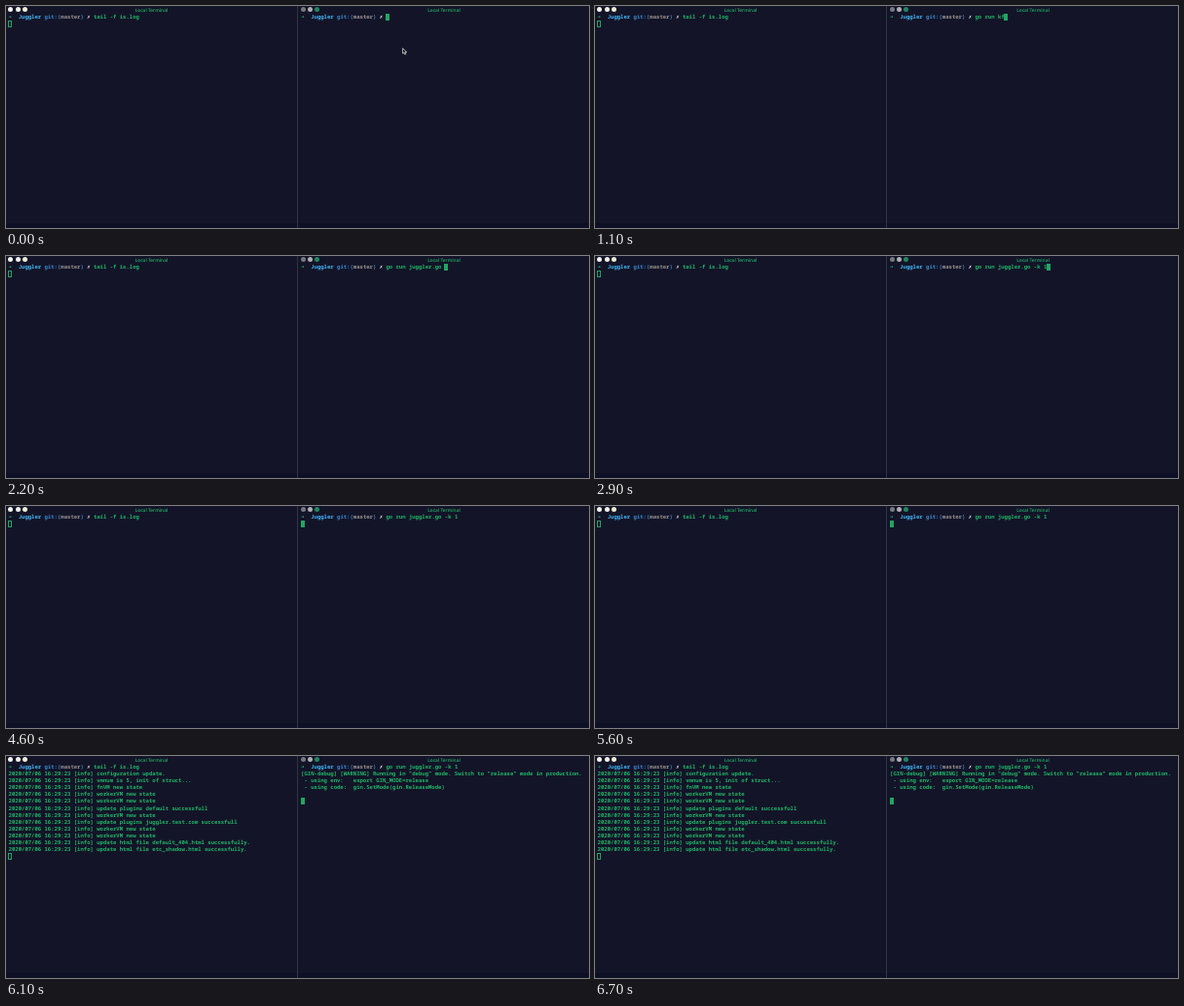
Animation of 599x229 px, one loop 6.9 s. Source, as an HTML page:

```html
<!DOCTYPE html>
<html lang="en">
<head>
<meta charset="utf-8">
<title>Two terminals</title>
<style>
  html, body { margin: 0; width: 100%; height: 100%; overflow: hidden; background: #131428; }
  #stage {
    position: relative; width: 599px; height: 229px; overflow: hidden;
    background: linear-gradient(#131428 224px, #0e1026 224px);
    text-rendering: geometricPrecision;
  }
  .term { position: absolute; top: 0; width: 299px; height: 229px; }
  #left { left: 0; }
  #right { left: 300.5px; }
  #split { position: absolute; left: 299px; top: 0; width: 1px; height: 229px; background: #323546; }
  .title {
    position: absolute; top: 1.6px; width: 100%; text-align: center;
    font: 600 4.8px/6px "Open Sans", sans-serif; color: #20b265;
  }
  .dot { position: absolute; top: .6px; width: 5px; height: 5px; border-radius: 50%; }
  pre {
    position: absolute; left: 2.6px; top: 8px; margin: 0;
    font: 600 5.6px/7.1px "Noto Sans Mono", "DejaVu Sans Mono", monospace; color: #20b265;
  }
  .cell { display: inline-block; width: 3.36px; height: 7.1px; vertical-align: top; }
  .dir { color: #43b4f4; font-weight: 700; }
  .git { color: #3b86cc; }
  .branch { color: #98918c; }
  .mark { color: #f0f0f0; }
  .cursor { box-sizing: border-box; width: 4px; height: 7px; margin-left: -.4px; background: #22a563; }
  .hollow { background: none; border: .8px solid #22a563; }
  #mouse { position: absolute; left: 406.5px; top: 43px; }
</style>
</head>
<body>
<div id="stage">
  <div id="left" class="term"></div>
  <div id="right" class="term"></div>
  <div id="split"></div>
  <svg id="mouse" width="6" height="8" viewBox="0 0 6 8">
    <path d="M.6 .6V6L1.9 4.9 2.8 7 3.8 6.6 2.9 4.6H4.7Z" fill="#111" stroke="#eee" stroke-width=".7"/>
  </svg>
</div>
<script>
const LOOP = 6900, ENTER = 3100, LOGS = 5800, SERVER = 5900;

const prompt = '<span class="cell">➜</span>  <span class="dir">Juggler</span> ' +
  '<span class="git">git:(</span><span class="branch">master</span><span class="git">)</span> ' +
  '<span class="cell mark">✗</span> ';

const worker = 'workerVM new state';
const logs = [
  'configuration update.',
  'vmnum is 5, init of struct...',
  'fnVM new state',
  worker, worker,
  'update plugins default successfull',
  worker,
  'update plugins juggler.test.com successfull',
  worker, worker,
  'update html file default_404.html successfully.',
  'update html file etc_shadow.html successfully.'
].map(line => '2020/07/06 16:29:23 [info] ' + line + '\n').join('');

const server =
  '[GIN-debug] [WARNING] Running in "debug" mode. Switch to "release" mode in production.\n' +
  ' - using env:   export GIN_MODE=release\n' +
  ' - using code:  gin.SetMode(gin.ReleaseMode)\n\n';

// [time in ms, command line]
const typing = [
  [0, ''], [100, 'g'], [200, 'go'], [400, 'go '], [500, 'go r'], [600, 'go ru'],
  [700, 'go run'], [800, 'go run '], [900, 'go run k'], [1000, 'go run kf'],
  [1200, 'go run k'], [1300, 'go run '], [1700, 'go run j'], [1800, 'go run ju'],
  [1900, 'go run jug'], [2000, 'go run juggler.go '], [2500, 'go run juggler.go -'],
  [2600, 'go run juggler.go -k'], [2700, 'go run juggler.go -k '], [2900, 'go run juggler.go -k 1']
];

function makeTerm(id, colors, hollow) {
  const dots = colors.map((c, i) =>
    `<i class="dot" style="left:${2.4 + 7.1 * i}px;background:${c}"></i>`).join('');
  const term = document.getElementById(id);
  term.innerHTML = dots + '<div class="title">Local Terminal</div><pre></pre>';
  const pre = term.querySelector('pre');
  const cursor = `<span class="cell cursor${hollow ? ' hollow' : ''}"></span>`;
  let shown = null;
  return text => {
    if (text !== shown) pre.innerHTML = prompt + text + cursor;
    shown = text;
  };
}

const showLeft = makeTerm('left', ['#f3f3ec', '#f3f3ec', '#eeeed4'], true);
const showRight = makeTerm('right', ['#77787f', '#aeb0b4', '#218761'], false);
const mouse = document.getElementById('mouse');

function draw(now) {
  const t = now % LOOP;
  const command = typing.filter(step => step[0] <= t).pop()[1];
  showLeft('tail -f is.log\n' + (t >= LOGS ? logs : ''));
  showRight(command + (t >= ENTER ? '\n' : '') + (t >= SERVER ? server : ''));
  mouse.style.display = t < 100 ? 'block' : 'none';
}

const start = performance.now();
function tick() {
  draw(performance.now() - start);
  requestAnimationFrame(tick);
}
tick();
</script>
</body>
</html>
```
